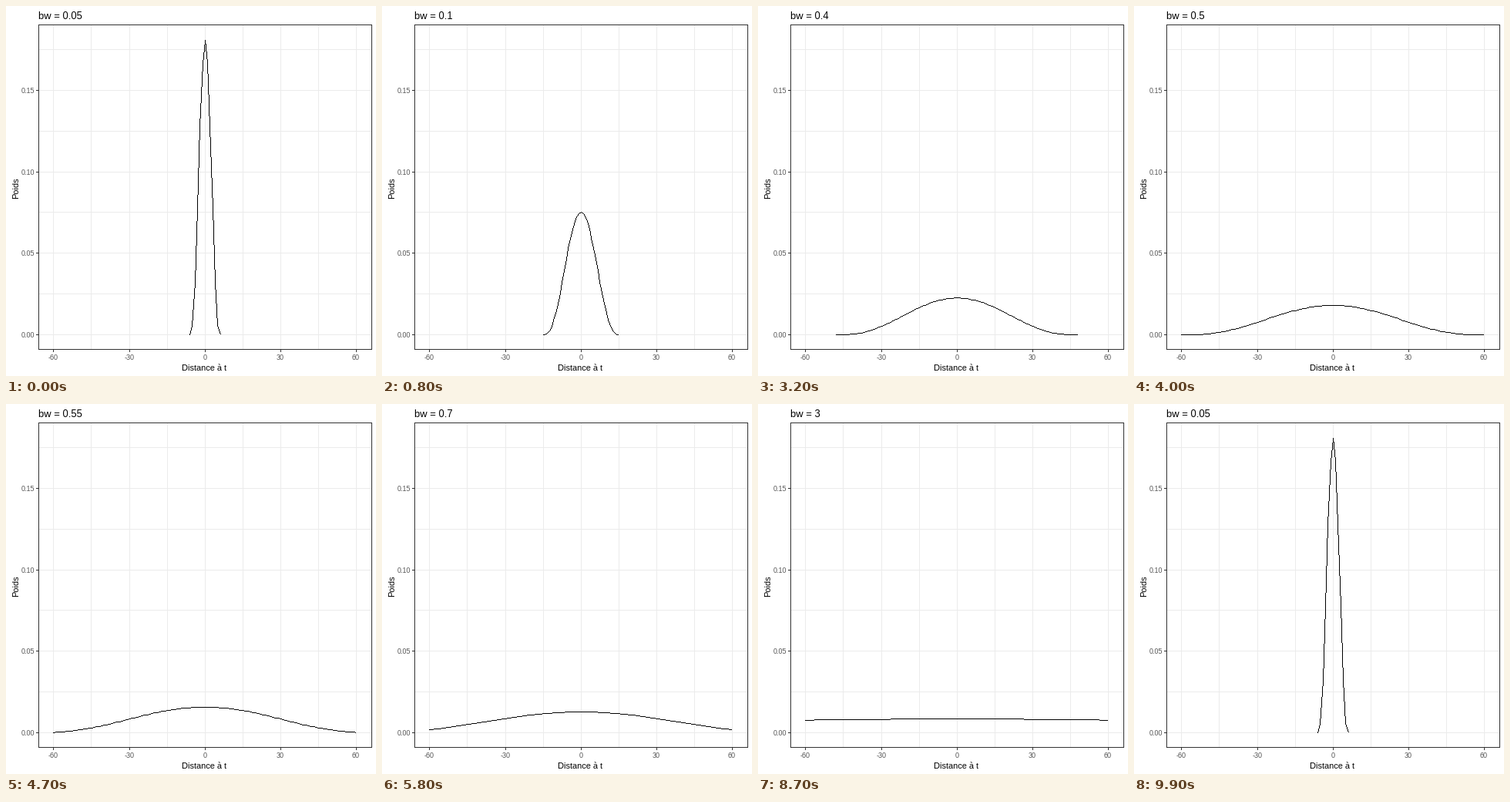
A matplotlib script for the animation above (10000 ms loop, 480 by 480 pixels).

```python
import matplotlib.pyplot as plt
import numpy as np
from matplotlib.animation import FuncAnimation
from matplotlib.patches import Rectangle

SIZE = 480
LEFT, RIGHT, TOP, BOTTOM = 42, 474, 24, 445
BANDWIDTHS = [round(0.05 * k, 2) for k in range(1, 21)] + [2, 3, 4, 5]
# Each change of bandwidth passes through one half-way frame.
CHANGES = np.r_[3:24:5, 27:48:4, 50:99:4]

plt.rcParams.update({
    "font.family": "Liberation Sans",
    "text.hinting": "native",
})

fig = plt.figure(figsize=(SIZE / 72, SIZE / 72), dpi=72, facecolor="white")
ax = fig.add_axes([0, 0, 1, 1])
ax.set(xlim=(0, SIZE), ylim=(SIZE, 0))
ax.axis("off")


def px(x):
    return np.floor(258.35 + 3.275 * np.asarray(x)).astype(int)


def py(y):
    return np.floor(426.7 - 2116.5 * np.asarray(y)).astype(int)


def box(x, y, w, h, color, zorder):
    ax.add_patch(Rectangle((x, y), w, h, facecolor=color, linewidth=0,
                           antialiased=False, zorder=zorder))


def label(x, y, text, size, color="black", **kwargs):
    return ax.text(x, y, text, fontsize=size, color=color,
                   va="baseline", zorder=5, **kwargs)


def draw_panel():
    grid, dark, grey = "#EBEBEB", "#333333", "#4D4D4D"
    width, height = RIGHT - LEFT + 1, BOTTOM - TOP + 1
    for x in range(-60, 61, 15):
        box(px(x), TOP, 1, height, grid, 1)
        if x % 30 == 0:
            box(px(x), BOTTOM + 1, 1, 3, dark, 1)
            label(px(x), 459, str(x), 9, grey, ha="center")
    for k in range(8):
        y = 0.025 * k
        box(LEFT, py(y), width, 1, grid, 1)
        if k % 2 == 0:
            box(LEFT - 3, py(y), 3, 1, dark, 1)
            label(37, py(y) + 4, f"{y:.2f}", 9, grey, ha="right")
    for x in (LEFT, RIGHT):
        box(x, TOP, 1, height, dark, 4)
    for y in (TOP, BOTTOM):
        box(LEFT, y, width, 1, dark, 4)
    label(257.5, 473, "Distance à t", 11, ha="center")
    label(16, 236, "Poids", 11, ha="center", rotation=90,
          rotation_mode="anchor")


def kernel(bw):
    """Normalised triweight weights on the integers from -60 to 60."""
    h = 121 * bw
    reach = int(min(60, h))
    x = np.arange(-reach, reach + 1)
    w = (1 - (x / h) ** 2) ** 3
    return np.array([x, w / w.sum()])


def resample(path, n):
    steps = np.arange(path.shape[1])
    return np.array([np.interp(np.linspace(0, steps[-1], n), steps, row)
                     for row in path])


def halfway(a, b):
    n = max(a.shape[1], b.shape[1])
    return (resample(a, n) + resample(b, n)) / 2


def rasterise(path):
    """Hard-edged one-pixel polyline as an RGBA layer."""
    layer = np.zeros((SIZE, SIZE, 4), dtype=np.uint8)
    xs, ys = px(path[0]), py(path[1])
    for x0, y0, x1, y1 in zip(xs, ys, xs[1:], ys[1:]):
        n = max(abs(x1 - x0), abs(y1 - y0))
        t = np.arange(n) / max(n, 1)
        cols = np.floor(x0 + t * (x1 - x0) + 0.5).astype(int)
        rows = np.floor(y0 + t * (y1 - y0) + 0.5).astype(int)
        layer[rows, cols, 3] = 255
    return layer


draw_panel()
title = label(42, 17, "", 13)
curve = ax.imshow(np.zeros((SIZE, SIZE, 4), dtype=np.uint8),
                  extent=(0, SIZE, SIZE, 0), interpolation="nearest",
                  aspect="auto", zorder=3)


def update(frame):
    state = int((CHANGES < frame).sum()) % len(BANDWIDTHS)
    bw = BANDWIDTHS[state]
    path = kernel(bw)
    if frame in CHANGES:
        following = BANDWIDTHS[(state + 1) % len(BANDWIDTHS)]
        path = halfway(path, kernel(following))
    title.set_text(f"bw = {bw:g}")
    curve.set_data(rasterise(path))
    return title, curve


anim = FuncAnimation(fig, update, frames=100, interval=100,
                     repeat=True, repeat_delay=0)
plt.show()
```
